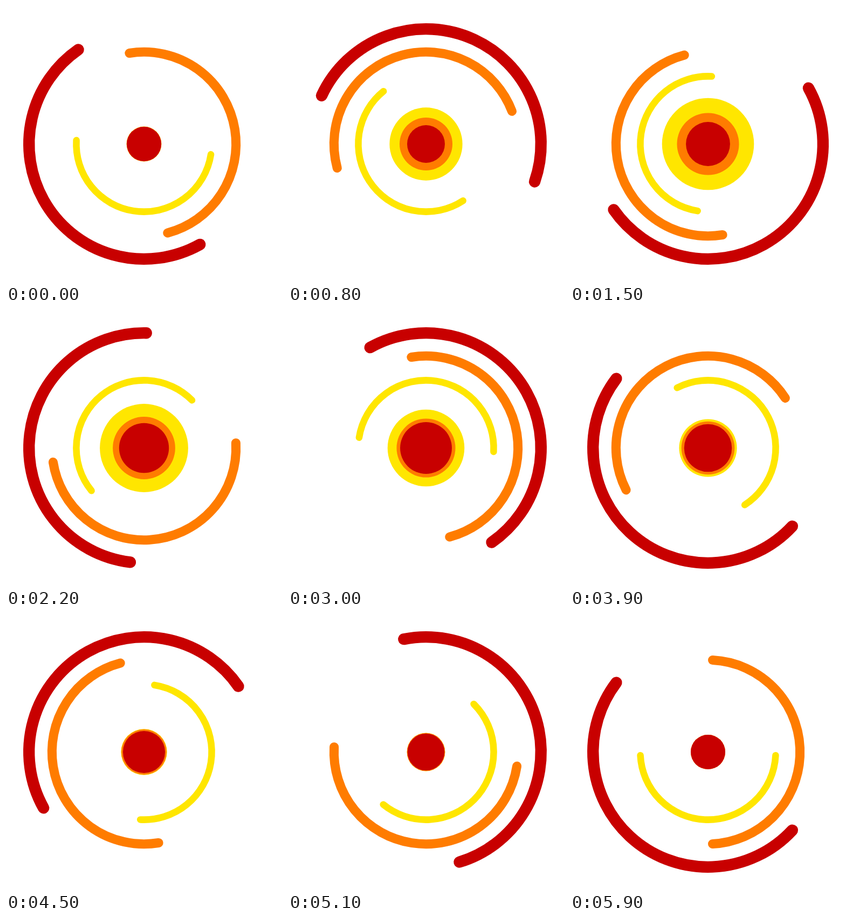
An HTML page with a canvas for the animation above (6000 ms loop, 512 px wide and 512 px high).

```html
<!DOCTYPE html>
<html lang="en">
<head>
<meta charset="utf-8">
<title>Spinning arcs</title>
<style>
  html, body { margin: 0; width: 100%; height: 100%; overflow: hidden; background: #fff; }
  canvas { display: block; width: 512px; height: 512px; }
</style>
</head>
<body>
<canvas id="stage" width="512" height="512"></canvas>
<script>
const ctx = document.getElementById('stage').getContext('2d');
const LOOP = 6000, STEP = 100, CENTER = 256;
const RED = '#c80000', ORANGE = '#ff7c00', YELLOW = '#ffe600';

// start is the middle of the arc in degrees; turns are per loop
const arcs = [
  { color: RED, radius: 213.33, start: 130, turns: 3 },
  { color: ORANGE, radius: 170.67, start: 0, turns: -2 },
  { color: YELLOW, radius: 125.6, start: 90, turns: 1 }
];

// keys are [time, radius], eased in and out between neighbours
const discs = [
  { color: YELLOW, keys: [[0, 32], [1500, 85.33], [6000, 32]] },
  { color: ORANGE, keys: [[0, 32], [1500, 57.5], [2200, 58], [3000, 54.6], [6000, 32]] },
  { color: RED, keys: [[0, 32], [3000, 48], [6000, 32]] }
];

// cubic-bezier(.42, 0, .58, 1), solved by bisection
function ease(x) {
  let low = 0, high = 1;
  for (let i = 0; i < 24; i++) {
    const s = (low + high) / 2, r = 1 - s;
    if (1.26 * s * r * r + 1.74 * s * s * r + s * s * s < x) low = s;
    else high = s;
  }
  return low * low * (3 - 2 * low);
}

function valueAt(keys, time) {
  const i = Math.max(1, keys.findIndex(key => key[0] >= time));
  const [t0, v0] = keys[i - 1], [t1, v1] = keys[i];
  return v0 + (v1 - v0) * ease((time - t0) / (t1 - t0));
}

function drawArc({ color, radius, start, turns }, time) {
  const middle = start * Math.PI / 180 + turns * 2 * Math.PI * time / LOOP;
  const half = Math.PI / 2 - 0.05; // round caps fill the rest of the half circle
  ctx.beginPath();
  ctx.arc(CENTER, CENTER, radius, middle - half, middle + half);
  ctx.strokeStyle = color;
  ctx.lineWidth = radius * 0.1;
  ctx.stroke();
}

function drawDisc({ color, keys }, time) {
  ctx.beginPath();
  ctx.arc(CENTER, CENTER, valueAt(keys, time), 0, 2 * Math.PI);
  ctx.fillStyle = color;
  ctx.fill();
}

function draw(now) {
  const time = (Math.floor(now % LOOP / STEP) + 1) * STEP;
  ctx.fillStyle = '#fff';
  ctx.fillRect(0, 0, 512, 512);
  ctx.lineCap = 'round';
  arcs.forEach(arc => drawArc(arc, time));
  discs.forEach(disc => drawDisc(disc, time));
}

let origin;
function tick(now) {
  origin ??= now;
  draw(Math.max(0, now - origin));
  requestAnimationFrame(tick);
}
draw(0);
requestAnimationFrame(tick);
</script>
</body>
</html>
```
